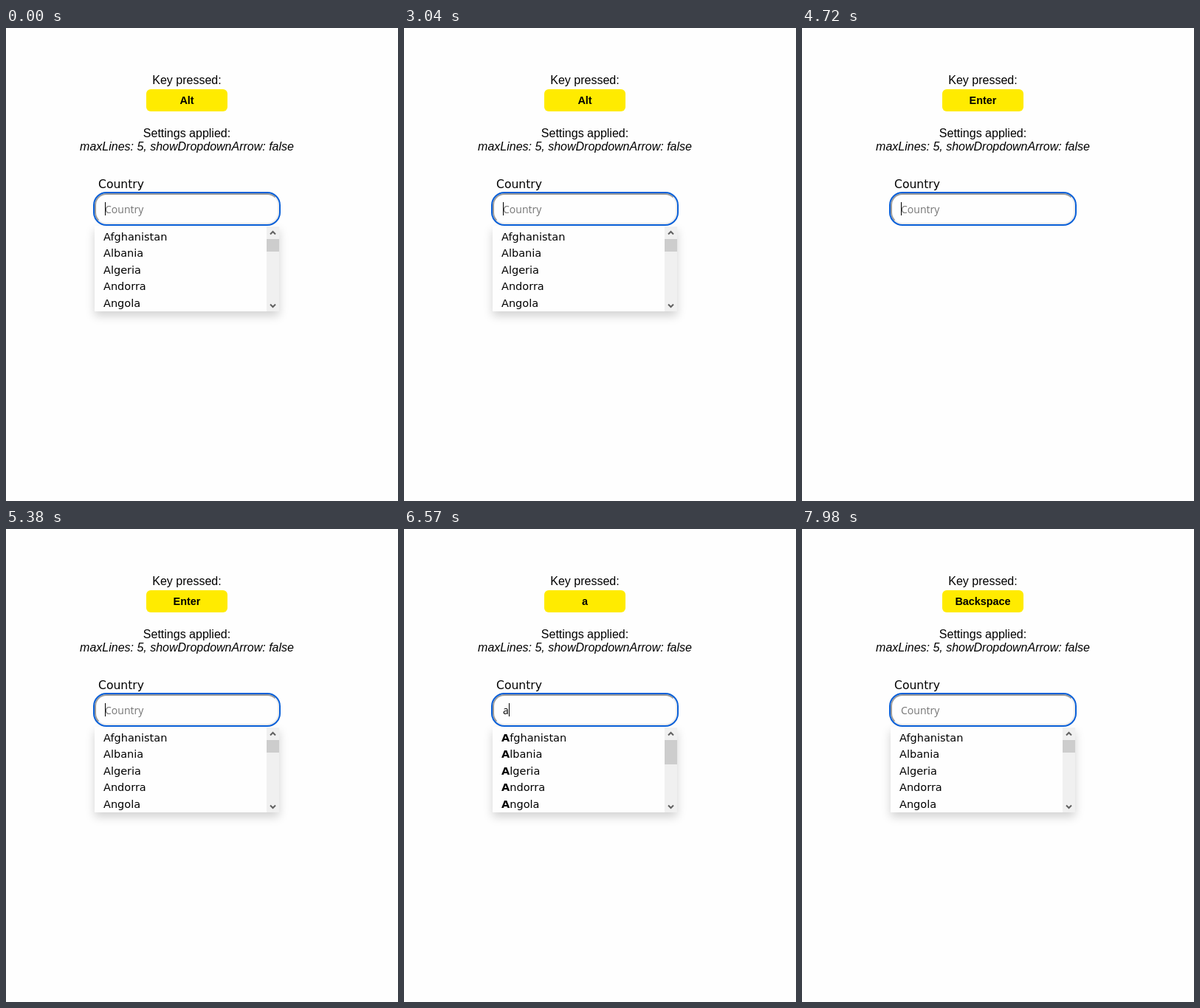
Animation, 531 px wide and 641 px high, one loop 8 s. Source, as an HTML page:

```html
<!DOCTYPE html>
<html lang="en">
<head>
<meta charset="utf-8">
<title>Country select</title>
<style>
html, body { margin: 0; width: 100%; height: 100%; overflow: hidden; background: #fefefe; }
.stage { position: relative; width: 531px; height: 641px; overflow: hidden; background: #fefefe; }
svg { position: absolute; left: 0; top: 0; }
text { font: 16px "Liberation Sans", Arial, sans-serif; white-space: pre; }
.mid { text-anchor: middle; }
.it { font-style: italic; }
.key { font-weight: 700; font-size: 14.4px; text-anchor: middle; }
.label { font: 15.6px "DejaVu Sans", sans-serif; }
.entry { font: 14px "Open Sans", sans-serif; }
.item { font: 14.5px "DejaVu Sans", sans-serif; }
.input, .menu { position: absolute; left: 120px; width: 250px; box-sizing: border-box; }
.input {
  top: 224px; height: 42px; border: 2px solid; border-color: #9a9a9a #ebebeb #ebebeb #9a9a9a;
  border-radius: 16px; outline: 2px solid #0a60d8; background: #fefefe;
}
.menu { top: 268px; height: 116px; background: #fefefe; box-shadow: 0 6px 12px rgba(0, 0, 0, .175); }

/* one shared 8 s clock, every change is a hard cut */
.alt, .enter, .a, .back, .hint, .typed, .menu, .list, .caret, .match, .thumb {
  animation: 8s step-end infinite;
}
.alt { animation-name: alt; }
.enter { animation-name: enter; }
.a { animation-name: a; }
.back { animation-name: back; }
.hint { animation-name: hint; }
.typed { animation-name: typed; }
.menu, .list { animation-name: menu; }
.caret { animation-name: blink, shift; }
.match { animation-name: match; }
.thumb { animation-name: thumb; }

@keyframes alt { 0% { visibility: visible } 59%, 100% { visibility: hidden } }
@keyframes enter { 0%, 82.125%, 100% { visibility: hidden } 59% { visibility: visible } }
@keyframes a { 0%, 99%, 100% { visibility: hidden } 82.125% { visibility: visible } }
@keyframes back { 0% { visibility: hidden } 99%, 100% { visibility: visible } }
@keyframes hint { 0%, 96.75%, 100% { visibility: visible } 79.875% { visibility: hidden } }
@keyframes typed { 0%, 96.75%, 100% { visibility: hidden } 79.875% { visibility: visible } }
@keyframes menu { 0%, 67.25%, 100% { visibility: visible } 59% { visibility: hidden } }
@keyframes blink {
  0%, 11.25%, 24.75%, 38%, 51.125%, 92.875% { opacity: 1 }
  4.625%, 18.625%, 31.75%, 45%, 86%, 99.75%, 100% { opacity: 0 }
}
@keyframes shift { 0%, 96.75%, 100% { transform: none } 79.875% { transform: translateX(8px) } }
@keyframes match { 0%, 99%, 100% { font-weight: 400 } 82.125% { font-weight: 700 } }
@keyframes thumb { 0%, 99%, 100% { height: 17px } 82.125% { height: 33px } }
</style>
</head>
<body>
<div class="stage">
  <div class="menu"></div>
  <div class="input"></div>
  <svg width="531" height="641" viewBox="0 0 531 641">
    <text class="mid" x="245" y="76">Key pressed:</text>
    <rect x="190" y="83" width="110" height="30" rx="6" fill="#ffeb00"/>
    <text class="key alt" x="245" y="103">Alt</text>
    <text class="key enter" x="245" y="103">Enter</text>
    <text class="key a" x="245" y="103">a</text>
    <text class="key back" x="245" y="103">Backspace</text>
    <text class="mid" x="245" y="148">Settings applied:</text>
    <text class="mid it" x="245" y="166">maxLines: 5, showDropdownArrow: false</text>

    <text class="label" x="125" y="217">Country</text>
    <text class="entry hint" x="134" y="251" fill="#757575">Country</text>
    <text class="entry typed" x="134" y="251">a</text>
    <rect class="caret" x="134" y="236" width="1" height="18"/>

    <g class="list">
      <text class="item" x="132" y="288"><tspan class="match">A</tspan>fghanistan</text>
      <text class="item" x="132" y="310"><tspan class="match">A</tspan>lbania</text>
      <text class="item" x="132" y="333"><tspan class="match">A</tspan>lgeria</text>
      <text class="item" x="132" y="355"><tspan class="match">A</tspan>ndorra</text>
      <text class="item" x="132" y="378"><tspan class="match">A</tspan>ngola</text>
      <rect x="353" y="269" width="17" height="115" fill="#f0f0f0"/>
      <rect class="thumb" x="353" y="286" width="17" height="17" fill="#cdcdcd"/>
      <path d="M358 279.5l3.5-3.5 3.5 3.5M358 374.5l3.5 3.5 3.5-3.5" fill="none" stroke="#606060" stroke-width="2"/>
    </g>
  </svg>
</div>
</body>
</html>
```
